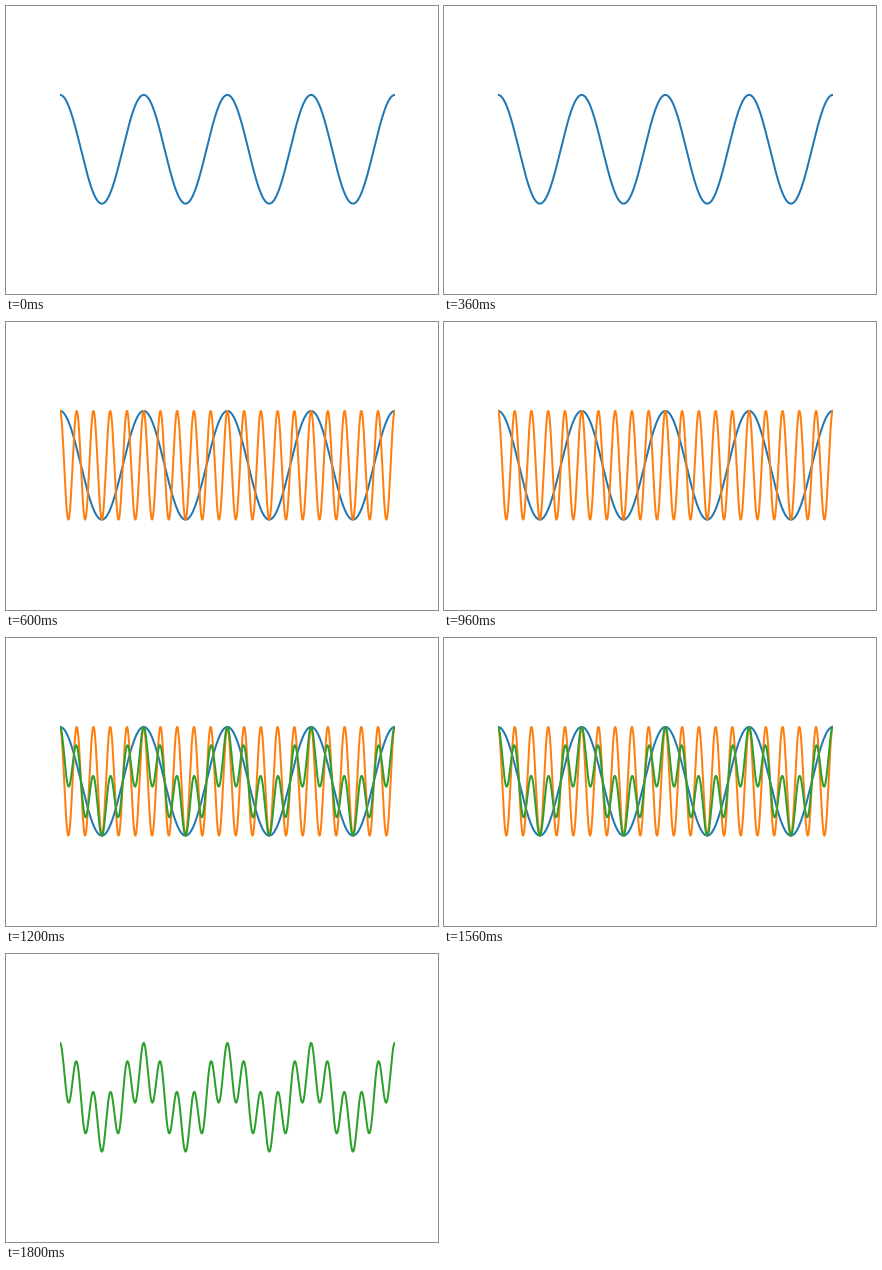
Write a matplotlib script that moves like this. It is 432 by 288 pixels and loops after 2400 ms.

```python
import numpy as np
import matplotlib.pyplot as plt
from matplotlib.animation import FuncAnimation

STEP_MS = 600

fig = plt.figure(figsize=(6, 4), dpi=72, facecolor="white")
ax = fig.add_axes([0.125, 0.125, 0.775, 0.755])
ax.set_xlim(0, 4)
ax.set_ylim(-2, 2)
ax.axis("off")

t = np.linspace(0, 4, 1000)
slow = np.cos(2 * np.pi * t)
fast = np.cos(2 * np.pi * 5 * t)
waves = [(slow, "#1f77b4"), (fast, "#ff7f0e"), ((slow + fast) / 2, "#2ca02c")]
lines = [ax.plot(t, y, color=color, lw=2)[0] for y, color in waves]

# Which waves (slow, fast, mean) are on at each step
steps = [(0,), (0, 1), (0, 1, 2), (2,)]


def draw(step):
    for i, line in enumerate(lines):
        line.set_visible(i in steps[step])
    return lines


anim = FuncAnimation(fig, draw, frames=len(steps), init_func=lambda: draw(0),
                     interval=STEP_MS, repeat=True, repeat_delay=0)
plt.show()
```
